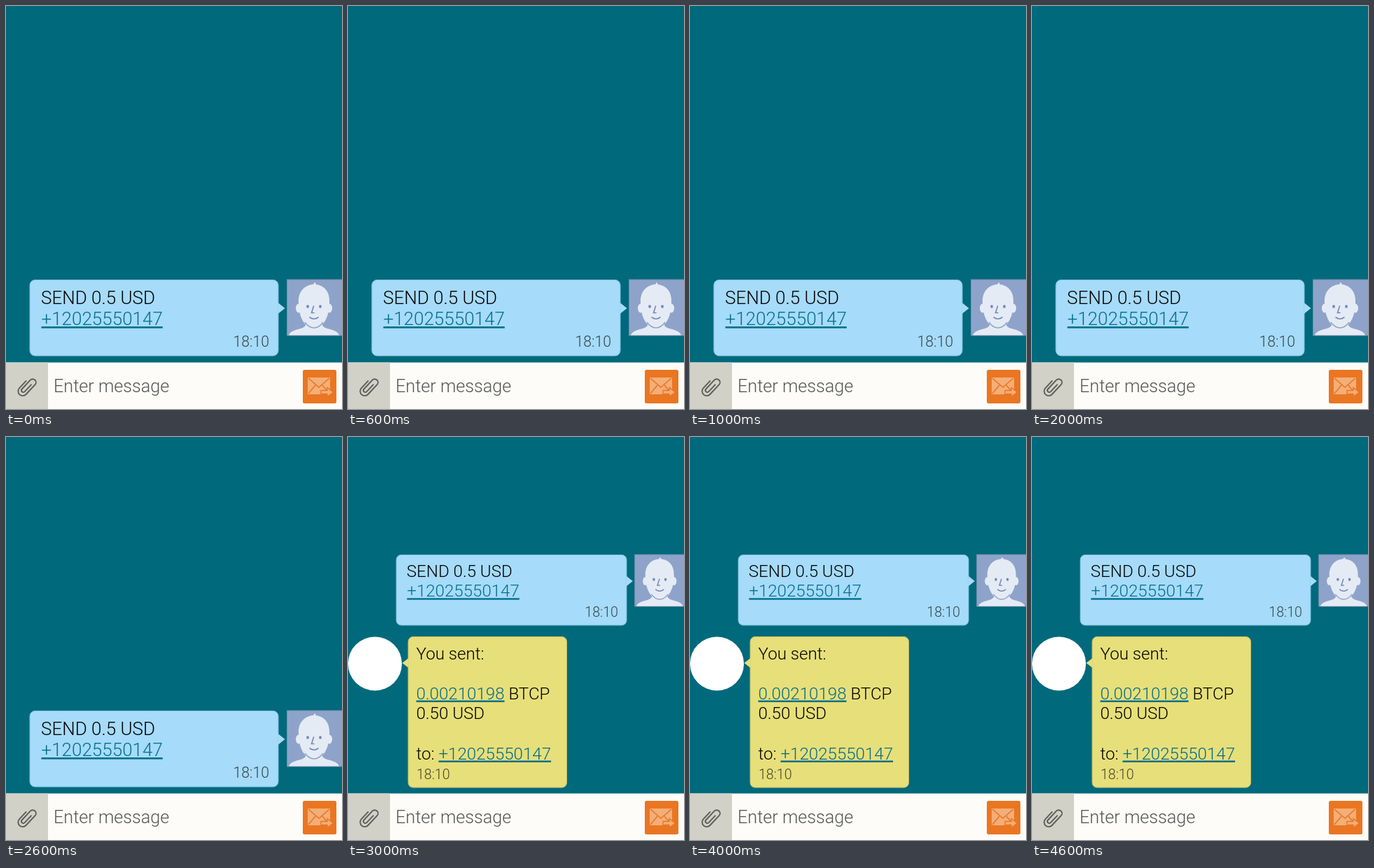
Recreate the animation shown at these times as an HTML page. Size 480 by 576 pixels, loop 5 s.

```html
<!DOCTYPE html>
<html lang="en">
<head>
<meta charset="utf-8">
<title>Text message payment</title>
<style>
  html, body { margin: 0; width: 100%; height: 100%; overflow: hidden; background: #00697c; }
  svg { display: block; width: 480px; height: 576px; }
  text { font: 300 26px Roboto, "Open Sans", sans-serif; fill: #000; white-space: pre; }
  .link { fill: #00708c; text-decoration: underline 1.3px; text-underline-offset: 2.5px; }
  .time { font-size: 21.2px; fill: #36454c; }
  .hint { font-size: 25.2px; fill: #555552; }
  .reply text { font-size: 24.1px; }
  .reply .time { font-size: 19.6px; fill: #454430; }
  .reply .link { fill: #006c8c; }

  .sent { animation: shift 5s step-end infinite; }
  .reply { animation: appear 5s step-end infinite; }
  @keyframes shift {
    0% { transform: none; }
    60%, 100% { transform: translate(37.5px, -194.3px) scale(.9267); }
  }
  @keyframes appear {
    0% { visibility: hidden; }
    60%, 100% { visibility: visible; }
  }
</style>
</head>
<body>
<svg viewBox="0 0 480 576">
  <rect width="480" height="576" fill="#00697c"/>

  <g class="sent">
    <rect x="34" y="391.5" width="355" height="108.5" rx="7.5" fill="#a6dbf9" stroke="#7cc0dc"/>
    <path d="M388.5 424L398.5 432L388.5 440Z" fill="#a6dbf9"/>
    <text x="50" y="425.5">SEND 0.5 USD</text>
    <text class="link" x="50.5" y="456">+12025550147</text>
    <text class="time" x="376" y="486.5" text-anchor="end">18:10</text>

    <g>
      <rect x="401" y="390.5" width="80" height="81" fill="#7389a6"/>
      <rect x="402" y="391.5" width="79" height="79" fill="#8ea3ca"/>
      <g fill="#e5ebf5">
        <path d="M404 470.5C406 465 413 463 421 461C427 459 429 457 429 450H451C451 457 453 459 459 461C467 463 474 465 476 470.5Z"/>
        <ellipse cx="418" cy="432" rx="4" ry="6.5"/>
        <ellipse cx="462" cy="432" rx="4" ry="6.5"/>
        <path d="M418 424C417 408 427 399 438 398Q441 397 440 395Q443 396 442.5 398C454 399 463 408 462 424C462 442 455 460 440 460C425 460 418 442 418 424Z"/>
      </g>
      <path d="M427 452Q433 460 440 460Q447 460 453 452" fill="none" stroke="#8ea3ca" stroke-width="1.5"/>
      <path d="M439.500 429L436.500 438.500H440M434 445Q440 449.500 446 445" fill="none" stroke="#7189b8" stroke-width="1.600" stroke-linecap="round"/>
      <g fill="#7189b8">
        <ellipse cx="431" cy="429.500" rx="1.900" ry="2.300"/>
        <ellipse cx="449" cy="429.500" rx="1.900" ry="2.300"/>
      </g>
    </g>
  </g>

  <g class="reply">
    <circle cx="38.5" cy="324" r="38.5" fill="#fff"/>
    <rect x="86" y="285.5" width="226.5" height="215.5" rx="7" fill="#e7df79" stroke="#bfc06b"/>
    <path d="M86.5 316L77.5 323L86.5 330Z" fill="#e7df79"/>
    <text x="97.5" y="317.5">You sent:</text>
    <text x="97.5" y="374.5"><tspan class="link">0.00210198</tspan> BTCP</text>
    <text x="97.5" y="403">0.50 USD</text>
    <text x="97.5" y="460.5">to: <tspan class="link">+12025550147</tspan></text>
    <text class="time" x="98" y="489">18:10</text>
  </g>

  <rect y="509.5" width="480" height="67" fill="#fdfcf8"/>
  <rect y="509.5" width="60" height="67" fill="#d2d1c7"/>
  <path transform="translate(30 544) rotate(43)" fill="none" stroke="#5c5d56" stroke-width="1.9" stroke-linecap="round"
    d="M-6.5 -5V9A6.5 6.5 0 0 0 6.5 9V-10A4.7 4.7 0 0 0 -2.9 -10V7.5A2.7 2.7 0 0 0 2.5 7.5V-6"/>
  <text class="hint" x="68" y="551.5">Enter message</text>

  <rect x="424" y="520" width="48" height="48" rx="2.5" fill="#ea7622"/>
  <rect x="431" y="531" width="32" height="24" fill="#f4ae78"/>
  <path d="M432 532L447 545L462 532M432 554L442 542M462 554L452 542" fill="none" stroke="#ea7622" stroke-width="1.6"/>
  <path d="M450 549.5H459V545.5L467.5 552L459 558.5V554.5H450Z" fill="#f4ae78" stroke="#ea7622" stroke-width="1.4"/>
</svg>
</body>
</html>
```
